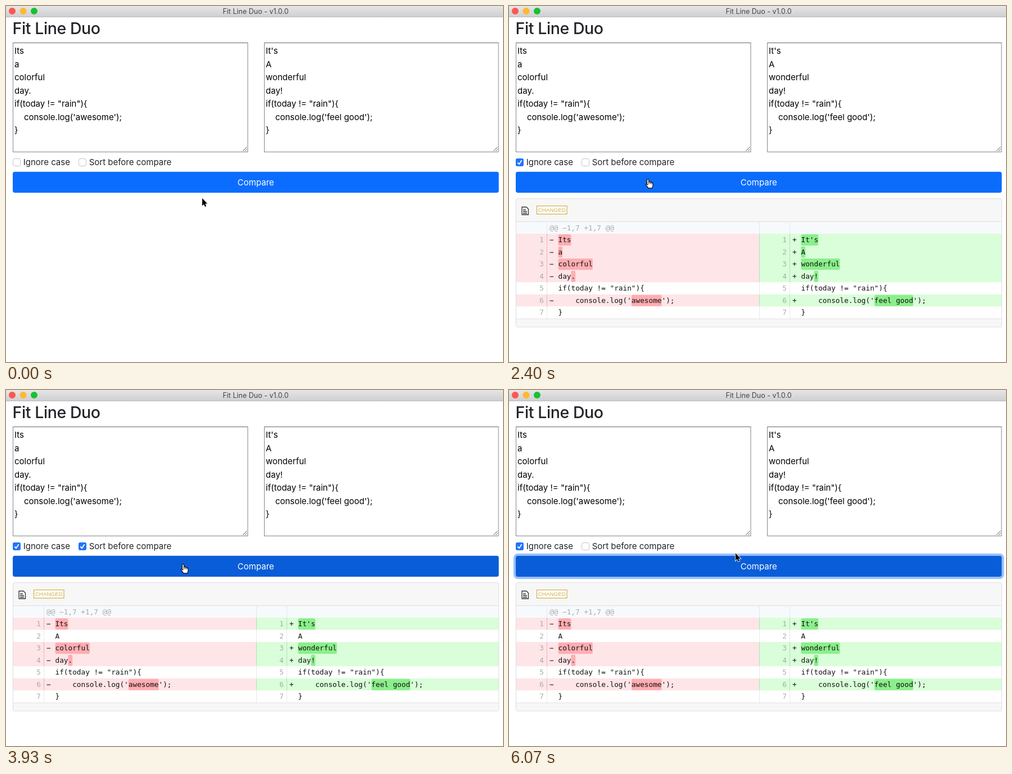
Recreate the animation shown at these times as an HTML page. Size 884 px wide and 633 px high, loop 6130 ms.

```html
<!DOCTYPE html>
<html lang="en">
<head>
<meta charset="utf-8">
<title>Fit Line Duo</title>
<style>
  html, body { margin: 0; width: 100%; height: 100%; overflow: hidden; background: #fff; }
  svg { display: block; }
  text { font: 15px Inter, sans-serif; fill: #212529; white-space: pre; }
  .area text { fill: #000; }
  .diff text { font: 12.74px "DejaVu Sans Mono", monospace; fill: #111; }
  .diff .muted { fill: #a9abad; }
  .diff .badge { font: 9.8px "Liberation Sans", sans-serif; fill: #cdb04a; }
</style>
</head>
<body>
<svg id="stage" width="884" height="633" viewBox="0 0 884 633"></svg>
<script>
const APP = 'Fit Line Duo';
const LOOP = 6130;
const ROW = 21.55, CHAR = 7.67;

const rect = (x, y, w, h, fill, extra = '') =>
  `<rect x="${x}" y="${y}" width="${w}" height="${h}" fill="${fill}" ${extra}/>`;
const text = (x, y, s, extra = '') => `<text x="${x}" y="${y}" ${extra}>${s}</text>`;
const path = (d, stroke, width = 1, fill = 'none', extra = '') =>
  `<path d="${d}" stroke="${stroke}" stroke-width="${width}" fill="${fill}" ${extra}/>`;

// --- static window parts ---
const light = (x, color) => `<circle cx="${x}" cy="9" r="6" fill="${color}"/>`;

function textArea(x, width, lines) {
  const r = x + width;
  return `<g class="area">${rect(x, 65.5, width, 194, '#fff', 'stroke="#858585"')}
    ${path(`M${x} 65.5H${r}`, '#666')}
    ${path(`M${r - 9} 258L${r - 1.5} 250.5M${r - 5} 258L${r - 1.5} 254.5`, '#555')}
    ${lines.map((s, i) => text(x + 2.5, 85.2 + i * 23.5, s)).join('')}</g>`;
}

const checkbox = (x, label, id) =>
  rect(x + .5, 271.5, 13, 13, '#fff', 'rx="3" stroke="#c4c4c4"') +
  `<g id="${id}">${rect(x, 271, 14, 14, '#1f75fa', 'rx="3"')}
    ${path(`M${x + 3.3} 278.3l2.7 3 4.7-7`, '#fff', 1.8)}</g>` +
  text(x + 18.7, 283.3, label);

// --- diff table: first character is the sign, brackets mark highlights, '' is a gap ---
const IF = 'if(today != "rain"){', SAME_IF = [' ' + IF, ' ' + IF];
const LOG = ["-    console.log('[awesome]');", "+    console.log('[feel good]');"];
const plain = [
  ['-[Its]', "+[It's]"], ['-[a]', '+[A]'], ['-[colorful]', '+[wonderful]'],
  ['-day[.]', '+day[!]'], SAME_IF, LOG, [' }', ' }']
];
const ignoreCase = plain.map((pair, i) => i === 1 ? [' A', ' A'] : pair);
const sorted = [
  LOG, ['-Its', ''], [' A', ' A'], ['-[colorful]', "+[It's]"],
  ['-day[.]', '+day[!]'], SAME_IF, ['', '+wonderful'], [' }', ' }']
];
const colors = {
  '-': { bg: '#fee5e7', edge: '#e9b4b6', mark: '#ffadb2' },
  '+': { bg: '#d9fed9', edge: '#b4e2b4', mark: '#8bef8b' },
  ' ': { bg: '#fff', edge: '#eaeaea' },
  '': { bg: '#ededed', edge: '#e0e0e0' }
};

function cell(x, width, gutter, y, line, number) {
  const sign = line.charAt(0), body = line.slice(1), c = colors[sign];
  let out = rect(x, y, width, ROW, c.bg) +
    path(`M${x + .5} ${y}v${ROW}M${x + gutter + .5} ${y}v${ROW}`, c.edge);
  if (!sign) return out;
  const start = body.indexOf('['), length = body.indexOf(']') - start - 1;
  const left = x + gutter + 20.5, base = y + 15;
  if (start >= 0)
    out += rect(left + start * CHAR, y + 1, length * CHAR, ROW - 1.5, c.mark, 'rx="2.5"');
  return out + text(x + gutter - 5, base, number, 'class="muted" text-anchor="end"') +
    text(x + gutter + 5, base, sign.replace('-', '−')) +
    text(left, base, body.replace(/[[\]]/g, ''));
}

function diff(rows, i) {
  const end = 405 + rows.length * ROW, count = [0, 0];
  const cells = rows.map(([a, b], r) => {
    const y = 405 + r * ROW;
    if (a) count[0]++;
    if (b) count[1]++;
    return cell(12, 433, 55, y, a, count[0]) + cell(445, 431, 54, y, b, count[1]);
  }).join('');
  return `<g class="diff" id="view${i}">
    ${rect(12.5, 342.5, 864, end - 327.5, '#f7f7f7', 'rx="3"')}
    ${path('M23 357.5h8l3.5 3.5v10h-11.5zM25 362.5h5M25 365.5h7M25 368.5h7', '#333', 1.3)}
    ${rect(49.5, 355.5, 53.5, 14.5, '#fff', 'stroke="#d2b64f" stroke-width="1.3"')}
    ${text(76.3, 366.3, 'CHANGED', 'class="badge" text-anchor="middle"')}
    ${rect(12, 383, 864, 22, '#f7fafc')}
    ${path('M12 383.5H876', '#dcdfe2')}
    ${path('M67.5 384v21M445.5 384v21M499.5 384v21', '#e0e8ee')}
    ${text(72, 399, '@@ −1,7 +1,7 @@', 'class="muted"')}
    ${cells}
    ${path(`M12 ${end + .5}H876`, '#e2e2e2')}
    ${rect(12.5, 342.5, 864, end - 327.5, 'none', 'rx="3" stroke="#dedede"')}</g>`;
}

stage.innerHTML = `
  <defs><linearGradient id="bar" x2="0" y2="1">
    <stop stop-color="#e7e6e7"/><stop offset="1" stop-color="#d0cfd0"/>
  </linearGradient></defs>
  ${rect(0, 0, 884, 19, 'url(#bar)')}${rect(0, 19, 884, 1, '#b9b8b9')}
  ${light(11, '#fc5650')}${light(30.5, '#fdb92f')}${light(50, '#18c132')}
  ${text(444, 13.6, APP + ' - v1.0.0', 'text-anchor="middle" style="font-size:12.5px;fill:#444"')}
  ${text(11.5, 50, APP, 'style="font-size:28.5px;font-weight:500;letter-spacing:-.4px"')}
  ${textArea(12.5, 417.5, ['Its', 'a', 'colorful', 'day.', IF, "    console.log('awesome');", '}'])}
  ${textArea(459.5, 416.5, ["It's", 'A', 'wonderful', 'day!', IF, "    console.log('feel good');", '}'])}
  ${checkbox(12, 'Ignore case', 'ignore')}${checkbox(129, 'Sort before compare', 'sort')}
  ${rect(10, 292.7, 868.5, 41.3, 'none', 'id="ring" rx="5.5" stroke="#3184fd" stroke-width="4"')}
  ${rect(12, 294.7, 864.5, 37.3, '', 'id="button" rx="3.7"')}
  ${text(444.3, 319.2, 'Compare', 'text-anchor="middle" style="fill:#fff"')}
  ${[plain, ignoreCase, sorted].map(diff).join('')}
  <g id="cursor">
    ${path('M0 .8V14.2L3 11.4 5 16 7.2 15.1 5.3 10.6H9.2Z', '#fff', 1.6, '#000', 'id="arrow" paint-order="stroke"')}
    <g id="hand">
      ${path('M-1.5 9.5V1.2Q-1.5-.3 0-.3T1.6 1.2V4.8q1.7-.9 2.7.5 1.7-.7 2.5.7 2.1-.3 2.2 1.7v3.2q0 2-1.4 4.9h-7q-1-2.4-3.9-5.1-1.1-2 .6-2.4 1.1.1 2.2 1.2z', '#111', 1.3, '#fff')}
      ${path('M1.6 4.8v3.8M4.3 5.3v3.3M6.8 6v3', '#111')}
    </g>
  </g>`;

// --- timeline: time, x, y of the pointer tip ---
const track = [
  [0, 349, 341], [66, 349, 341], [200, 343, 328], [333, 338, 322], [1267, 338, 322],
  [1467, 132, 310], [1600, 50, 292], [1930, 18, 280], [2000, 18, 280], [2333, 200, 294],
  [2400, 247, 308], [2533, 275, 318], [3067, 275, 318], [3200, 256, 290], [3400, 137, 279],
  [3530, 137, 279], [3733, 225, 291], [3933, 315, 310], [4600, 315, 310], [4800, 264, 282],
  [4933, 262, 280], [5000, 262, 280], [5200, 137, 279], [5333, 327, 325], [5930, 327, 325],
  [6067, 403, 289], [LOOP + 10, 403, 289]
];
const focused = [[730, 2050], [2670, 3450], [4250, 5190], [5730, 9000]];
const hovered = [[150, 1570], [2390, 3180], [3780, 4700], [5300, 6040]];

const clamp = v => Math.max(0, Math.min(1, v));
const fade = (t, spans) =>
  Math.max(...spans.map(([on, off]) => clamp((t - on) / 150) - clamp((t - off) / 150)));
const show = (el, on) => el.style.display = on ? '' : 'none';

function pointerAt(t) {
  const i = track.findIndex(key => key[0] > t);
  const [t0, x0, y0] = track[i - 1], [t1, x1, y1] = track[i];
  const k = (t - t0) / (t1 - t0);
  return [x0 + (x1 - x0) * k, y0 + (y1 - y0) * k];
}

function draw(now) {
  // The picture advances at 15 steps per second.
  const t = Math.floor((now % LOOP + 4) * .015) / .015;
  const [x, y] = pointerAt(t);
  const overButton = y >= 294.7 && y < 332;
  cursor.setAttribute('transform', `translate(${x} ${y})`);
  show(hand, overButton);
  show(arrow, !overButton);

  const focus = fade(t, focused), dark = Math.max(focus, fade(t, hovered));
  const mix = (a, b) => Math.round(a + (b - a) * dark);
  button.setAttribute('fill', `rgb(${mix(11, 10)},${mix(109, 93)},${mix(255, 216)})`);
  ring.setAttribute('opacity', focus / 2);

  show(ignore, t >= 2060);
  show(sort, t >= 3460 && t < 5190);
  const view = t < 860 ? -1 : t < 2790 ? 0 : t >= 4390 && t < 5860 ? 2 : 1;
  [view0, view1, view2].forEach((el, i) => show(el, i === view));
}

const start = performance.now();
(function tick() {
  draw(performance.now() - start);
  requestAnimationFrame(tick);
})();
</script>
</body>
</html>
```
